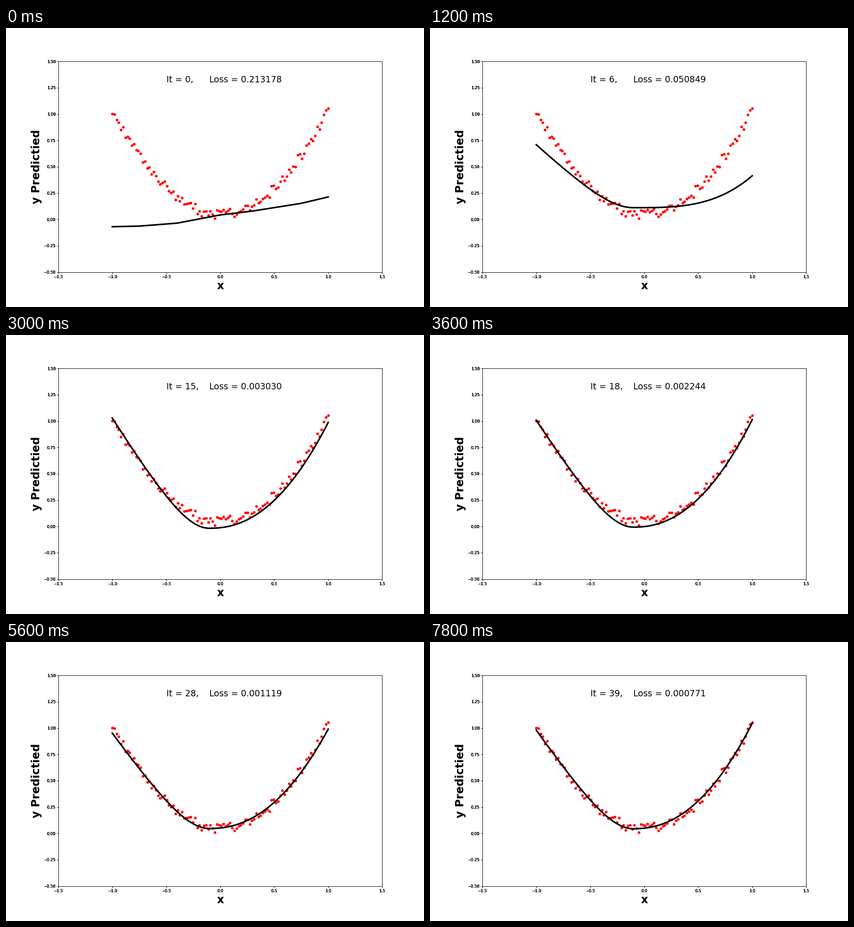
A matplotlib script for the animation above (8 s loop, 917 by 611 pixels).

```python
import numpy as np
import matplotlib.pyplot as plt
from matplotlib.animation import FuncAnimation

W, H, DPI = 917, 611, 64
PT = W / 15 / DPI          # all sizes are laid out for a 15 inch wide figure
TEXT = 1.012 * PT
FRAMES, INTERVAL = 40, 200

plt.rcParams.update({
    "font.family": "DejaVu Sans",
    "xtick.labelsize": 10 * TEXT, "ytick.labelsize": 10 * TEXT,
    "xtick.major.size": 3.5 * PT, "ytick.major.size": 3.5 * PT,
    "xtick.major.pad": 3.5 * PT, "ytick.major.pad": 3.5 * PT,
    "xtick.major.width": 0.8 * PT, "ytick.major.width": 0.8 * PT,
    "axes.linewidth": 0.8 * PT,
})

# Parabola with uniform noise built from the low 24 bits of each draw
bits = np.random.RandomState(1234).randint(0, 2**32, 100, dtype=np.uint32)
x = np.linspace(-1, 1, 100)
y = x ** 2 + 0.1 * (bits & 0xFFFFFF) / 2**24

# Untrained prediction
start = np.interp(x, [-1, -0.75, -0.4, 0, 0.3, 0.75, 1],
                  [-0.069, -0.063, -0.035, 0.043, 0.08, 0.153, 0.214])

# Key iterations: loss, and height of the bowl at its left end, bottom, right end
KEYS = [0, 6, 12, 15, 22, 28, 33, 39]
LOSS = [0.213178, 0.050849, 0.007765, 0.003030,
        0.001503, 0.001119, 0.000869, 0.000771]
LEFT = [0.71, 0.71, 0.96, 1.03, 0.981, 0.953, 0.97, 0.981]
LOW = [0.112, 0.112, 0.062, -0.017, 0.008, 0.047, 0.053, 0.045]
RIGHT = [0.415, 0.415, 0.82, 0.988, 1.05, 0.991, 1.006, 1.046]
LOW_X = -0.1


def bowl(it):
    """Hyperbola falling to LOW_X, then a power curve rising from it."""
    left, low, right = (np.interp(it, KEYS, v) for v in (LEFT, LOW, RIGHT))
    u = np.clip((LOW_X - x) / (1 + LOW_X), 0, 1)
    v = np.clip((x - LOW_X) / (1 - LOW_X), 0, 1)
    c = 0.4
    fall = (np.hypot(u, c) - c) / (np.hypot(1, c) - c)
    rise = v ** np.interp(it, [6, 15], [3.2, 2.2])
    return low + (left - low) * fall + (right - low) * rise


def predict(it):
    k = min(it / 6, 1)
    return start * (1 - k) + bowl(it) * k


def loss(it):
    return np.exp(np.interp(it, KEYS, np.log(LOSS)))


fig = plt.figure(figsize=(W / DPI, H / DPI), dpi=DPI, facecolor="white")


def add_axes():
    a = fig.add_axes([0.125, 0.125, 0.775, 0.755], facecolor="none")
    a.set(xlim=(-1.5, 1.5), ylim=(-0.5, 1.5),
          xticks=np.arange(-1.5, 1.6, 0.5), yticks=np.arange(-0.5, 1.6, 0.25))
    return a


ax = add_axes()
for _ in range(4):         # stacked axes give the heavy tick labels
    add_axes()

label = dict(fontsize=28 * TEXT, fontweight="bold", labelpad=4 * PT)
ax.set_xlabel("x", **label)
ax.set_ylabel("y Predictied", **label)
ax.scatter(x, y, s=36 * PT ** 2, color="red", linewidths=PT)
line, = ax.plot(x, predict(0), color="black", lw=4 * PT)
step_text = ax.text(-0.5, 1.3, "", fontsize=22 * TEXT)
loss_text = ax.text(-0.1, 1.3, "", fontsize=22 * TEXT)


def update(it):
    line.set_ydata(predict(it))
    step_text.set_text(f"It = {it},")
    loss_text.set_text(f"Loss = {loss(it):.6f}")
    return line, step_text, loss_text


anim = FuncAnimation(fig, update, frames=FRAMES, interval=INTERVAL,
                     repeat=True, repeat_delay=0)
plt.show()
```
